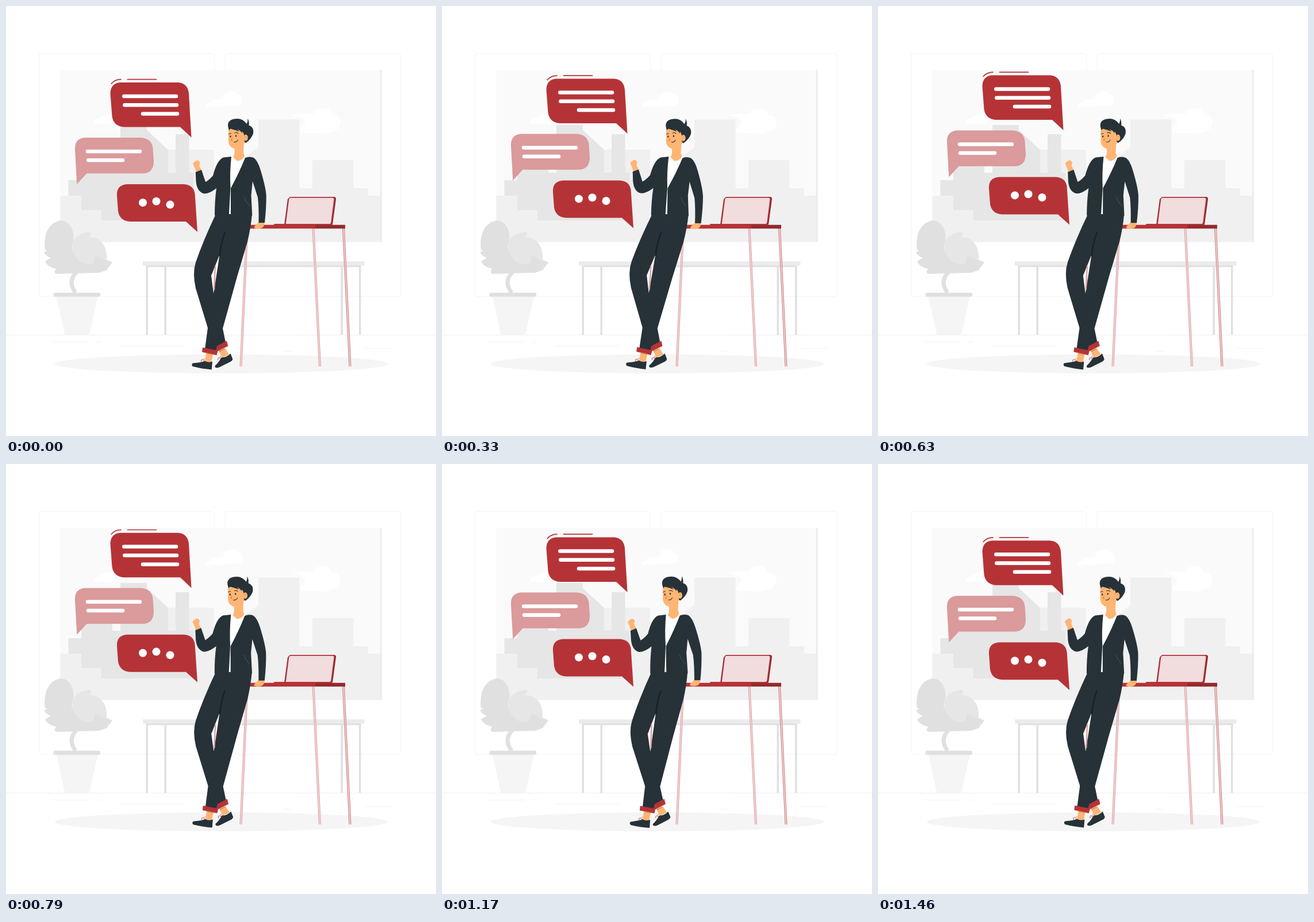
An HTML page with a canvas that plays this animation: 748 by 748 pixels, repeating every 1500 ms.

```html
<!DOCTYPE html>
<html lang="en">
<head>
<meta charset="utf-8">
<title>Chat at the office</title>
<style>
  html, body { margin: 0; width: 100%; height: 100%; overflow: hidden; background: #fff; }
  canvas { display: block; }
</style>
</head>
<body>
<canvas id="stage" width="748" height="748"></canvas>
<script>
const ctx = document.getElementById('stage').getContext('2d');
const LOOP = 1500;
const RED = '#b53337', DARK_RED = '#942a2d', PINK = '#db9a9b', PALE = '#f1dcde';
const INK = '#263238', SKIN = '#ffb573', WHITE = '#fff';

function fill(d, color) {
  ctx.fillStyle = color;
  ctx.fill(new Path2D(d));
}

function stroke(d, color, width, cap = 'butt') {
  ctx.strokeStyle = color;
  ctx.lineWidth = width;
  ctx.lineCap = cap;
  ctx.lineJoin = 'round';
  ctx.stroke(new Path2D(d));
}

function box(x1, y1, x2, y2, color) {
  ctx.fillStyle = color;
  ctx.fillRect(x1, y1, x2 - x1, y2 - y1);
}

function oval(x, y, rx, ry, color) {
  ctx.fillStyle = color;
  ctx.beginPath();
  ctx.ellipse(x, y, rx, ry, 0, 0, Math.PI * 2);
  ctx.fill();
}

function frame(x, y, w, h, r) {
  ctx.strokeStyle = '#f5f5f5';
  ctx.lineWidth = 1.2;
  ctx.beginPath();
  ctx.roundRect(x, y, w, h, r);
  ctx.stroke();
}

function drawWindow() {
  frame(57.6, 82.5, 305, 422.8, 5);
  frame(381.3, 82.5, 305.4, 422.8, 5);
  box(94.5, 111, 651, 410.5, '#fafafa');

  const far = '#f0f0f0', near = '#e6e6e6';
  fill('M94.5 330H326V250H362V303H398V276L439 246V197.5H510.5V317H533V268H604.5V317H630V330H653.5V410.5H94.5Z', far);
  box(273, 250, 326, 335, far);
  box(651, 111, 653.5, 410.5, '#ebebeb');
  fill('M108.5 303H131V270H185V290H199V207H245V216L282 250V290H295V223H318.5V290H326V373H166V355H131V330H108.5Z', near);

  fill('M346 176Q347 169 355 168Q359 161 368 163Q374 161 377 163Q378 150 391 149Q400 148 403 154Q412 154 411 163Q412 171 403 173Q374 175 346 176Z', WHITE);
  fill('M497 191Q512 185 525 188Q530 186 535 188Q538 178 551 178Q565 178 567 190Q582 190 582 203Q581 217 564 219Q555 224 545 221Q530 222 515 220Q510 219 512 213Q522 206 520 200Q516 193 497 191Z', WHITE);
  fill('M152 205Q153 197 163 195Q169 188 179 190L190 184V205Z', WHITE);
}

function drawFloor() {
  stroke('M0 572.4H748', '#efefef', 1);
  stroke('M80 584.5H143M157 584.5H166M197 591.4H309M482 600.5H497M594 582.3H605M624 596H672', '#f3f3f3', 1);
  oval(374.5, 622.5, 290, 16.5, '#f5f5f5');
}

function drawBench() {
  box(243.5, 451, 617.5, 454.2, '#e0e0e0');
  for (const x of [243.5, 275.5, 582.5, 614]) box(x, 452, x + 3.5, 572, '#e0e0e0');
  box(238, 444.3, 623.5, 451.5, '#ebebeb');
}

function drawPlant() {
  const leaf = '#e0e0e0', light = '#e6e6e6';
  fill('M87.5 505H160L145 572.3H102.5Z', '#f5f5f5');
  ctx.fillStyle = leaf;
  ctx.beginPath();
  ctx.roundRect(82.5, 498.7, 81.5, 7, 3);
  ctx.fill();
  stroke('M123 463C112 473 111 485 121 499', leaf, 7);
  fill('M67.5 423C65 397 74 378 93 373.5C109 371 119 389 117 406L112 436L86 440Z', leaf);
  fill('M115 411Q126 393 148 393Q149 399 144 402C164 401 177 418 175 441L185 446Q178 460 163 464L118 458Z', light);
  fill('M66 428Q76 424 90 431Q101 419 115 421Q133 419 139 437Q157 430 171 442L185 446Q177 451 176 459L160 464L88 466Q82 465 87 457Q72 454 68 444Q74 441 78 438Q69 435 66 428Z', leaf);
  fill('M113 423Q133 408 151 426Q158 436 151 448Q131 452 122 437Z', light);
}

function tableLeg(x1, y1, x2, y2, edge) {
  const d = `M${x1} ${y1}L${x2} ${y2}`;
  stroke(d, edge, 4);
  stroke(d, '#f0d5d6', 2);
}

function drawTable() {
  const soft = '#df9fa1';
  tableLeg(366, 387, 361.5, 500, soft);
  tableLeg(419.5, 386, 408.5, 627, soft);
  tableLeg(534.5, 386, 546, 627, soft);
  tableLeg(587, 386, 598.5, 627, '#cf777a');
  box(424, 380.7, 538, 387.2, RED);
  box(538, 380.7, 590, 387.2, DARK_RED);

  fill('M495 332H570Q574.5 332 574 336L568.5 377Q568 381 564 381H484L490 336Z', DARK_RED);
  fill('M495.5 333H568Q571.5 333 571 337L566 376Q565.5 380 562 380H486L491.5 337Q492 333 495.5 333Z', PALE);
  stroke('M495.5 333H568Q571.5 333 571 337L566 376Q565.5 380 562 380H486L491.5 337Q492 333 495.5 333Z', RED, 1.4);
  stroke('M467 380H567', RED, 2.2, 'round');
}

function drawBubbles() {
  fill('M199 133H299Q316 134 318 152L322.5 228.7L303 210.5H205Q187 209 184.5 192L181.5 152Q182 134 199 133Z', RED);
  stroke('M205.3 157H296M206.3 172.3H297M238 187.6H298', WHITE, 6.5, 'round');
  stroke('M183.2 135.2Q189 128 200 127.7M211.5 127.7H261.5', RED, 1.7, 'round');

  fill('M138 229H234Q253 230 255.5 247L257 270Q257 290 239 291.3H140.5L123.3 310L120 250Q119 230 138 229Z', PINK);
  stroke('M142 253H233M143 268.3H203', WHITE, 6.5, 'round');

  fill('M211 310H309Q327 311 328.7 328L333 393L313 375H216Q198 374 195 357L193 330Q192 311 211 310Z', RED);
  for (const [x, y] of [[238, 342], [261.5, 339.8], [285.5, 345.6]]) oval(x, y, 7, 7, WHITE);
}

function drawLegs() {
  fill('M348 604L360 606L357 621L346 619Z', SKIN);
  fill('M370 600L381 595L388 606L376 612Z', SKIN);
  fill('M323.5 623Q324 621 328 621Q339 620 346 617.5Q351 621 359 618.5L357.8 632.5Q340 631 325 627Q323 626 323.5 623Z', INK);
  fill('M363.5 626Q371 619 374.5 611.5Q383 612 390.5 604.5L394.3 614Q394 617 390 619L371 628.5Q363 631 363.5 626Z', INK);
  stroke('M340 619Q338 615 342 615L346 618M344 615L346 613M369 616Q367 612 371 612L375 614M372 611L374 609', RED, 0.9);
  fill('M365 362H428Q426 385 420 410L402 471L377 561L382 585L366 600L346 597L351 560L330 491Q324 465 330 446Q343 408 365 362Z', INK);
  fill('M371.5 433L357 469L361 500L366 469Z', WHITE);
  stroke('M364 452L362 494', '#df9fa1', 2.4);
  stroke('M381 394Q373 415 372 435', '#182125', 2.5);
  fill('M342 594L368.5 599.5L366.5 607.5L341 602Z', RED);
  fill('M367 591.5L384 582.5L386.3 591.5L368.5 600.5L365 600Z', RED);
  stroke('M349 604L360 606.3M371 601L380 596.5', '#d18a4e', 1.6);
}

function drawTorso() {
  fill('M388 263L418 262L413 300L396 361H386Z', WHITE);
  fill('M397 246L414 235L413 256L416 263Q408 272 402 269L395 263Q399 258 397 246Z', SKIN);
  fill('M392 261Q395 267 403 269.5Q412 268 415 261L419 264L412 272L404 270L394 270L390 265Z', WHITE);
  stroke('M394 266L403 270L412 268', '#e0e0e0', 0.7);

  fill('M327 272Q332 266 336 270Q339 272 336 277L340 286L331 290L329 283L325 274Z', SKIN);
  fill('M440 375L450 376Q450 381 447 385Q440 389 432 386Q430 384 436 380Z', SKIN);

  fill('M378 263.5L392 262Q389 290 390.5 316L388 361L387 364.5L363 364.5Q363 339 366 317Q352 328 343 326Q332 322 330.5 305L329.8 289L340 285L347 306Q352 304 360 295Q367 268 378 263.5Z', INK);
  fill('M416 264Q424 261 431 264Q438 269 443 286Q452 316 452.7 330Q453 350 450 377L439.5 377Q440 350 438 333L429 305L426.5 329L428.3 364.5H392L391 361V317Q406 289 416 264Z', INK);
  stroke('M414 332Q417 340 423.5 348', '#455a64', 0.9);
}

function drawHead() {
  fill('M387 212L414 211L421 222L414 240Q410 250 401 249Q388 247 387 236Z', SKIN);
  fill('M386.5 211Q384 199 397 196.5Q411 194 418.5 205Q421 201 420.3 195.5Q423.5 201 422.5 207.5Q432 211 430 222Q427 231 417.5 238L415 237L414 224Q411 215 411 221Q407 216 402 214Q407 219 405 218Q397 215 390.5 213.5L388 216Z', INK);
  oval(417, 229, 3.8, 5.6, SKIN);
  stroke('M415 229Q416 226 419 227', '#d18a4e', 0.7);
  oval(390.5, 227, 1.2, 1.8, INK);
  oval(400, 226, 1.2, 1.8, INK);
  stroke('M387.5 223Q389 221 391.5 222M398 220.7Q402 219 404 222', INK, 1, 'round');
  fill('M393.6 227L390.7 234.2Q392 235.4 394 234.8Z', '#ed8f45');
  stroke('M396.5 236.5Q401 237.5 403.3 233', INK, 1, 'round');
}

// Sway: 0 → 1° → -1° → 0, with linear segments.
function swayAngle(p) {
  if (p < 0.25) return p * 4;
  if (p < 0.75) return 2 - p * 4;
  return p * 4 - 4;
}

function draw(time) {
  const p = ((time + 25) % LOOP) / LOOP;
  const lift = 15 * (1 - Math.abs(2 * p - 1)) - 0.5;
  ctx.fillStyle = WHITE;
  ctx.fillRect(0, 0, 748, 748);
  drawWindow();
  drawFloor();
  drawBench();
  drawPlant();
  drawTable();

  ctx.save();
  ctx.translate(0, -lift);
  drawBubbles();
  ctx.restore();

  ctx.save();
  ctx.translate(387, 414);
  ctx.rotate((swayAngle(p) - 0.067) * Math.PI / 180);
  ctx.translate(-387, -414);
  drawLegs();
  drawTorso();
  drawHead();
  ctx.restore();
}

const start = performance.now();
function tick() {
  draw(performance.now() - start);
  requestAnimationFrame(tick);
}
tick();
</script>
</body>
</html>
```
